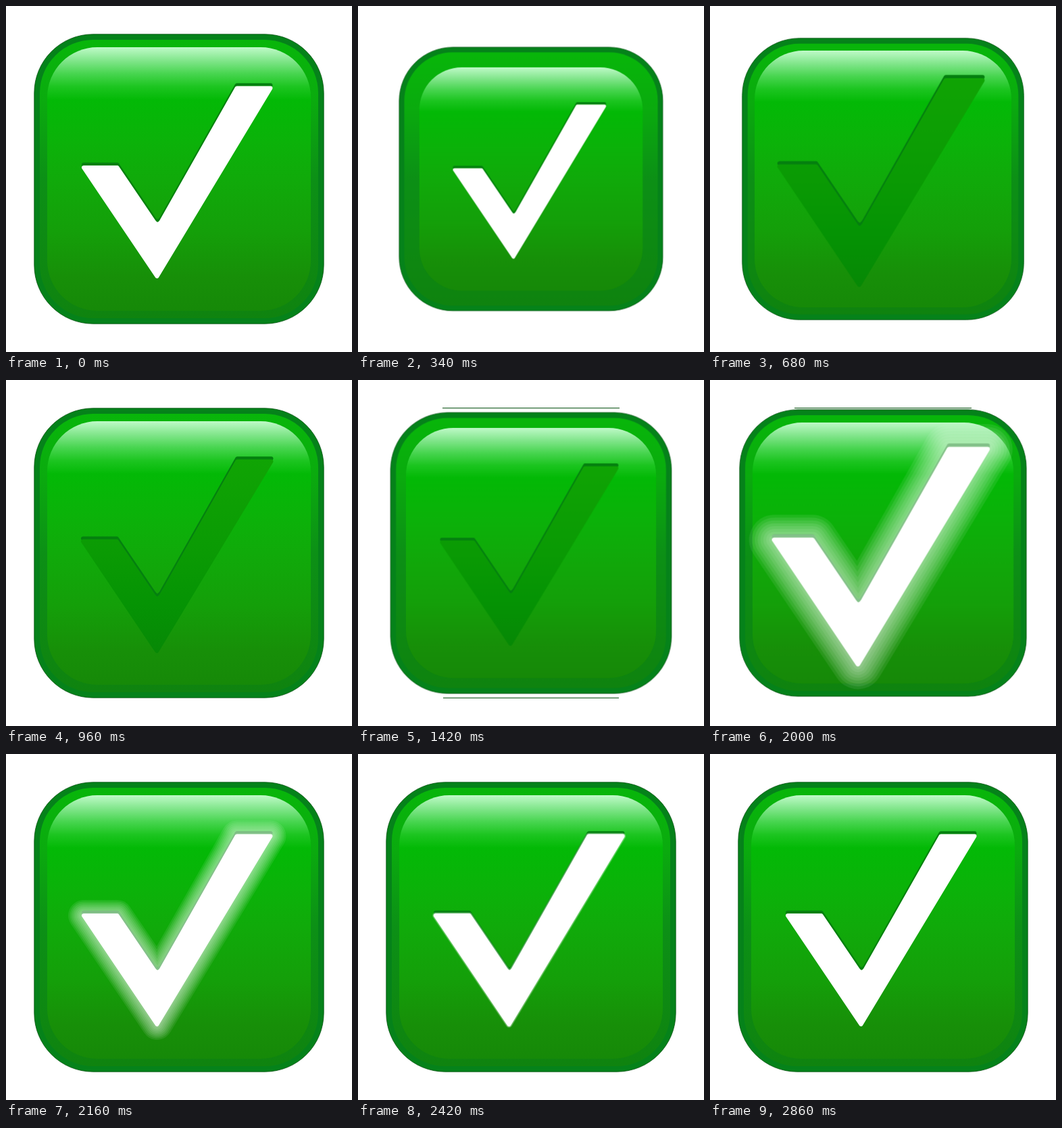
Write an HTML page that moves like this. It is 512 by 512 pixels and loops after 3000 ms.

```html
<!DOCTYPE html>
<html lang="en">
<head>
<meta charset="utf-8">
<title>Check button</title>
<style>
@property --g { syntax: '<number>'; inherits: true; initial-value: 0; }

html, body { margin: 0; width: 100%; height: 100%; overflow: hidden; background: #fff; }
svg { display: block; width: 100vw; height: 100vh; }

.box, .face, .check, .white, .glow, .edge { animation: 3s linear infinite; }
.box, .face, .check { transform-origin: 256px 256px; }
.box { animation-name: box; }
.face { animation-name: face; }
.check { animation-name: check; stroke-width: 6px; stroke-linejoin: round; }
.white { animation-name: white; }
.glow { animation-name: glow; fill: none; stroke: #fff; stroke-opacity: .085; }
.glow use { stroke-width: calc((var(--g) * 2 * var(--k) + 6) * 1px); }
.edge { fill: #04500f; animation-timing-function: step-end; }
.top { animation-name: top-edge; }
.bottom { animation-name: bottom-edge; }

/* Each press runs twice per loop, 1280 ms apart. */
@keyframes box {
  0%, 42.667% { transform: scale(1); animation-timing-function: cubic-bezier(.4, 0, .3, 1); }
  15.333%, 58% { transform: scale(.905); animation-timing-function: cubic-bezier(.4, 0, .75, .6); }
  22.667%, 65.333% { transform: scale(.972); }
  24%, 66.667% { transform: scale(.99); animation-timing-function: ease-out; }
  26%, 68.667%, 100% { transform: scale(1); }
}
@keyframes face {
  0%, 42.667% { transform: scale(1); animation-timing-function: cubic-bezier(.4, 0, .3, 1); }
  15.333%, 58% { transform: scale(.838); animation-timing-function: cubic-bezier(.4, 0, .6, .75); }
  22.667%, 65.333% { transform: scale(.974); }
  24%, 66.667% { transform: scale(.99); animation-timing-function: ease-out; }
  26%, 68.667%, 100% { transform: scale(1); }
}
@keyframes check {
  0%, 42.667% { transform: scale(1); animation-timing-function: cubic-bezier(.4, 0, .3, 1); }
  15.333%, 58% { transform: scale(.79); animation-timing-function: cubic-bezier(.3, 0, .7, .7); }
  22.667%, 65.333% { transform: scale(1.084); }
  24%, 66.667% { transform: scale(1.141); animation-timing-function: ease-out; }
  25.167%, 67.833% { transform: scale(1.16); animation-timing-function: ease-in-out; }
  29.333%, 72% { transform: scale(1); animation-timing-function: ease-in-out; }
  32%, 74.667% { transform: scale(1.007); animation-timing-function: ease-in-out; }
  35.333%, 78%, 100% { transform: scale(1); }
}
@keyframes white {
  0%, 17.333% { opacity: 1; }
  21.333%, 60.667% { opacity: 0; }
  64.667%, 100% { opacity: 1; }
}
@keyframes glow {
  0%, 60.667% { --g: 0; opacity: 0; animation-timing-function: ease-in; }
  65.333% { --g: 16; opacity: 1; }
  66.667% { --g: 29; opacity: 1; animation-timing-function: ease-out; }
  67.833% { --g: 41; opacity: 1; animation-timing-function: ease-out; }
  72% { --g: 20; opacity: 1; }
  79% { --g: 6; opacity: 1; animation-timing-function: ease-out; }
  82.667% { --g: 0; opacity: 1; }
  84%, 100% { --g: 0; opacity: 0; }
}
@keyframes top-edge {
  0% { opacity: 0; }
  43.333% { opacity: 1; }
  68.667%, 100% { opacity: 0; }
}
@keyframes bottom-edge {
  0% { opacity: 0; }
  43.333% { opacity: 1; }
  66%, 100% { opacity: 0; }
}
</style>
</head>
<body>
<svg viewBox="0 0 512 512">
  <defs>
    <linearGradient id="ring" x2="0" y2="1">
      <stop offset="0" stop-color="#08b60a"/>
      <stop offset="0.22" stop-color="#0aab0e"/>
      <stop offset="0.5" stop-color="#0c9016"/>
      <stop offset="1" stop-color="#0f830f"/>
    </linearGradient>
    <linearGradient id="shine" x2="0" y2="1">
      <stop offset="0" stop-color="#bffac8"/>
      <stop offset="0.05" stop-color="#82e68c"/>
      <stop offset="0.1" stop-color="#48d550"/>
      <stop offset="0.15" stop-color="#1cc520"/>
      <stop offset="0.2" stop-color="#03b906"/>
      <stop offset="0.36" stop-color="#0bb209"/>
      <stop offset="0.5" stop-color="#10aa0a"/>
      <stop offset="0.7" stop-color="#149f09"/>
      <stop offset="0.87" stop-color="#178f08"/>
      <stop offset="1" stop-color="#168908"/>
    </linearGradient>
    <linearGradient id="off" gradientUnits="userSpaceOnUse" x1="0" y1="118" x2="0" y2="404">
      <stop offset="0" stop-color="#10a404"/>
      <stop offset="0.5" stop-color="#0a9a04"/>
      <stop offset="0.75" stop-color="#059304"/>
      <stop offset="1" stop-color="#078806"/>
    </linearGradient>
    <path id="tick" d="M115 239H164.5L218.5 318.7Q224.5 327.5 230.6 317.5L341.6 121.5H391.5L223.5 400Z"/>
  </defs>

  <rect class="edge top" x="125" y="41" width="262" height="1"/>
  <rect class="edge bottom" x="126" y="470" width="260" height="1"/>

  <g class="box">
    <rect x="41.8" y="41.8" width="428.4" height="428.4" rx="87" fill="#05821a" stroke="#04500f" stroke-width=".8"/>
    <rect x="50" y="50" width="412" height="412" rx="79" fill="url(#ring)"/>
  </g>
  <rect class="face" x="61" y="61" width="390" height="390" rx="74" fill="url(#shine)"/>

  <g class="check">
    <use href="#tick" y="-4.3" fill="#04800f" stroke="#04800f"/>
    <use href="#tick" fill="url(#off)" stroke="url(#off)"/>
    <g class="glow">
      <use href="#tick" style="--k:1"/>
      <use href="#tick" style="--k:.875"/>
      <use href="#tick" style="--k:.75"/>
      <use href="#tick" style="--k:.625"/>
      <use href="#tick" style="--k:.5"/>
      <use href="#tick" style="--k:.375"/>
      <use href="#tick" style="--k:.25"/>
      <use href="#tick" style="--k:.125"/>
    </g>
    <use class="white" href="#tick" fill="#fff" stroke="#fff"/>
  </g>
</svg>
</body>
</html>
```
